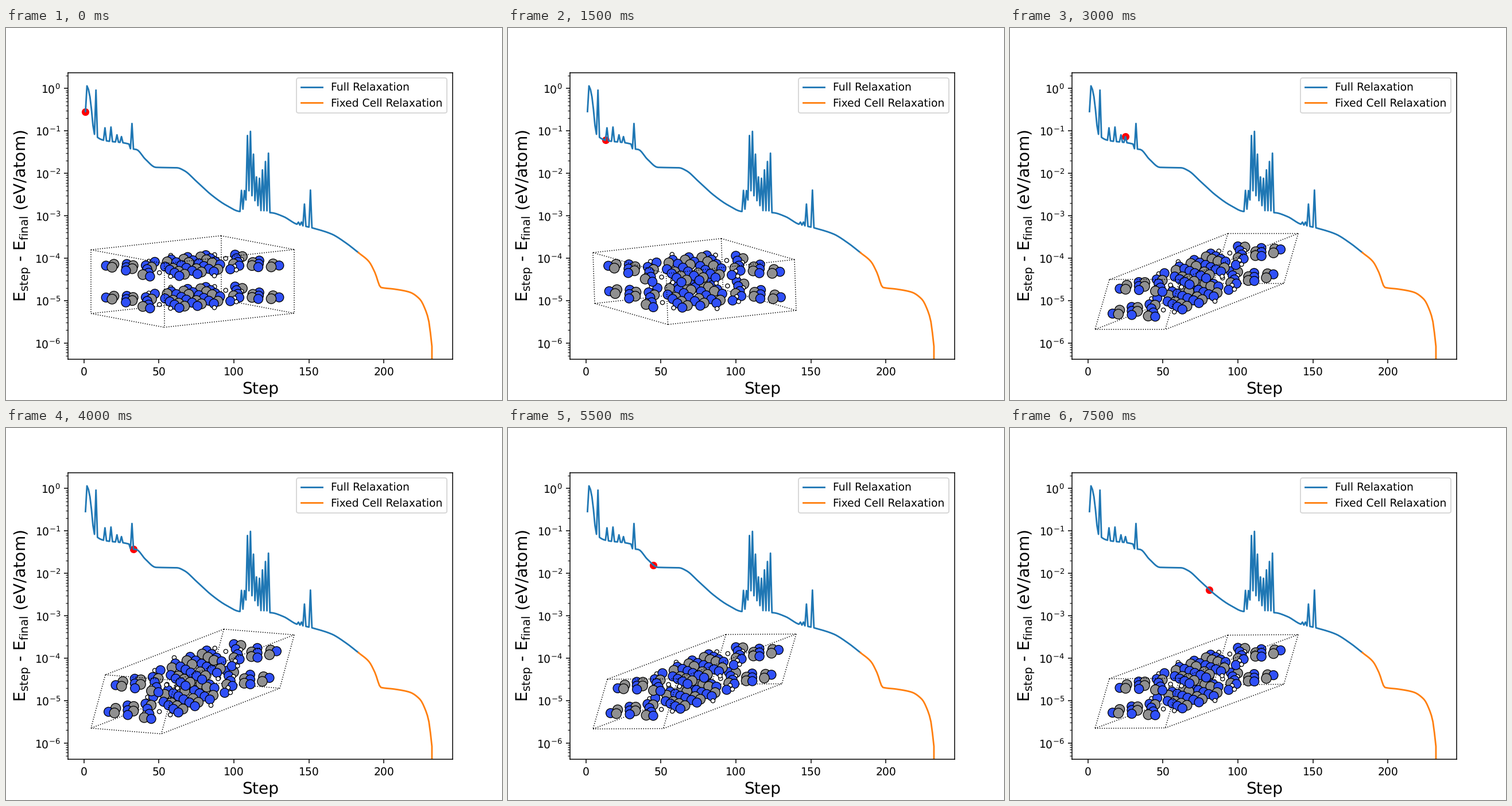
A matplotlib script for the animation above (8 s loop, 864 by 648 pixels).

```python
from itertools import product

import numpy as np
import matplotlib.pyplot as plt
from matplotlib.animation import FuncAnimation
from matplotlib.collections import LineCollection

W, H, DPI = 864, 648, 135
FRAMES, INTERVAL = 16, 500
plt.rcParams['text.hinting'] = 'none'


# --- energy curves, in powers of ten -------------------------------------
def smooth(keys, s):
    """Monotone cubic through the (step, value) keys."""
    x, y = np.array(keys, float).T
    h = np.diff(x)
    d = np.diff(y) / h
    p, q = d[:-1], d[1:]
    inner = np.where(p * q > 0, 2 * p * q / (p + q), 0)
    m = np.concatenate([d[:1], inner, d[-1:]])
    k = np.clip(np.searchsorted(x, s, 'right') - 1, 0, len(h) - 1)
    t = (s - x[k]) / h[k]
    curve = h[k] * t * (1 - t) * (m[k] * (1 - t) - m[k + 1] * t)
    return y[k] + (y[k + 1] - y[k]) * t * t * (3 - 2 * t) + curve


full = np.arange(1, 184)
log_full = smooth([(1, -.544), (2, .06), (4, -.2), (7, -1.08), (13, -1.22),
                   (30, -1.31), (31, -1.42), (35, -1.44), (41, -1.67),
                   (48, -1.86), (62, -1.87), (67, -1.94), (75, -2.19),
                   (85, -2.51), (95, -2.757), (104, -2.9), (125, -2.93),
                   (133, -3.02), (142, -3.2), (152, -3.285), (165, -3.43),
                   (175, -3.65), (183, -3.87)], full)
for s, rise in [(8, 1.08), (14, .3), (18, .34), (22, .17), (25, .14),
                (32, .6), (143, .06), (145, .08), (147, .52), (151, .88)]:
    log_full[s - 1] += rise

# Zigzag burst: odd steps jump high, even steps fall back.
odd, even = np.arange(105, 125, 2), np.arange(106, 124, 2)
log_full[odd - 1] += np.interp(odd, [107, 109, 111, 115, 117, 123],
                               [.5, 1.8, 1.9, .83, .8, 1.4])
log_full[even - 1] += np.interp(even, [106, 110, 118], [.06, .5, .04])

fixed = np.arange(183, 234)
log_fixed = smooth([(183, -3.87), (190, -4.08), (194, -4.34), (198, -4.69),
                    (207, -4.73), (217, -4.8), (224, -4.97), (228, -5.25),
                    (230, -5.5), (232, -6.08)], fixed)
log_fixed[-1] = -100

# --- plot ----------------------------------------------------------------
fig, ax = plt.subplots(figsize=(W / DPI, H / DPI), dpi=DPI)
ax.plot(full, 10 ** log_full, label='Full Relaxation')
ax.plot(fixed, 10 ** log_fixed, label='Fixed Cell Relaxation')
dot, = ax.plot([], [], 'ro', zorder=1.9)
ax.set_yscale('log')
ax.set_xlim(-10.65, 245.65)
ax.set_ylim(10 ** -6.379, 10 ** .3727)
ax.set_xlabel('Step', fontsize=15)
ax.set_ylabel(r'E$_{\mathrm{step}}$ - E$_{\mathrm{final}}$ (eV/atom)',
              fontsize=15, labelpad=2.4)
ax.legend(loc='upper right')

# --- crystal -------------------------------------------------------------
# Strands of evenly spaced atoms: first place, spacing, count (x + yj,
# from the layer centre). Inversion completes a layer; two layers stack.
strands = {
    'N': [(-139.7 + 34j, 0, 1), (-106.8 + 22.5j, .6 + 7j, 3),
          (-75.5 + 18j, 3.8 + 7.2j, 4), (-62.5 + 7j, 0, 1),
          (-44 + 13j, 9 + 4.7j, 4), (-37 - 4.5j, 9.3 + 3.9j, 4),
          (-11.5 - 16j, 10 + 4.8j, 2)],
    'C': [(-127.5 + 28j, -1.8 + 7j, 2), (-96 + 23.3j, 6.8j, 2),
          (-65.5 + 19.5j, -11 + 19j, 2), (-30.5 + 13.5j, 10.6 + 4j, 3),
          (-42.5 + 2j, 0, 1), (-17 - 10j, 9.5 + 5j, 2)],
    'H': [(-72.5 + 8j, 4.5 + 7j, 2), (-50.5 + 28j, -26 + 4j, 2),
          (-31 + 31.5j, -8.5 - 44.5j, 2)]}
looks = {'N': (8.0, '#3050f8'), 'C': (8.6, '#909090'), 'H': (3.6, 'white')}
PLANE = np.array([[124, -204], [.5, 80.5]])

atoms = []
for kind, rows in strands.items():
    for start, gap, count in rows:
        for n, sign, w in product(range(count), (1, -1), (-.25, .25)):
            p = sign * (start + n * gap)
            u, v = np.linalg.solve(PLANE, (p.real, p.imag))
            atoms.append((u + v - .2 * w, (u, v, w), *looks[kind]))
atoms.sort(key=lambda atom: atom[0])
_, frac, radius, color = zip(*atoms)
frac = np.array(frac)

CENTRE = np.array([325, 441.6])
WIDTH = 354


def cell(i):
    """Cell vectors: the layers collapse, the cell shears, then rings out."""
    lead, after = min(i, 3), max(i - 6, 0)
    shear = np.clip((i - 3) / 3, 0, 1)
    swell = 12.5 * np.sin(np.pi * shear)
    ring = 16 * np.exp(-after / 4.5) * np.sin(np.pi * after / 4.8)
    collapse = 24 * np.exp(-i / 1.5) * np.cos(2 * np.pi * i / 3.6)
    a = 127.5 - 5 * shear, (24 + 4.2 * lead) * (1 - shear) + swell + ring
    c = lead - 28 * shear, 87 + collapse + .5 * swell + .6 * ring
    b = a[0] + abs(c[0]) - WIDTH, 24.5 + 56 * shear + swell - .5 * after
    return np.array([a, b, c])


# Split the twelve edges into those behind and those before the atoms.
back, front = [], []
for axis in range(3):
    for q in product((-.5, .5), repeat=2):
        ends = [np.insert(q, axis, e) for e in (-.5, .5)]
        behind = all(ends[0][k] < 0 for k in (0, 1) if k != axis)
        (back if behind else front).append(ends)
back, front = np.array(back), np.array(front)

stage = fig.add_axes([0, 0, 1, 1])
stage.set(xlim=(0, W), ylim=(H, 0))
stage.axis('off')
style = dict(colors='black', linewidths=.8, linestyles=':')
back_lines = stage.add_collection(LineCollection([], zorder=1, **style))
front_lines = stage.add_collection(LineCollection([], zorder=3, **style))
balls = stage.scatter(*np.zeros((2, len(atoms))),
                      s=(2 * np.array(radius) * 72 / DPI) ** 2, c=color,
                      edgecolors='black', linewidths=.7, zorder=2)


def update(i):
    s = 4 * i + 1 if i < 12 else 10 * i - 69
    dot.set_data([s], [10 ** log_full[s - 1]])
    m = cell(i)
    balls.set_offsets(CENTRE + frac @ m)
    back_lines.set_segments(CENTRE + back @ m)
    front_lines.set_segments(CENTRE + front @ m)
    return dot, balls, back_lines, front_lines


anim = FuncAnimation(fig, update, frames=FRAMES, interval=INTERVAL,
                     repeat=True, repeat_delay=0)
plt.show()
```
